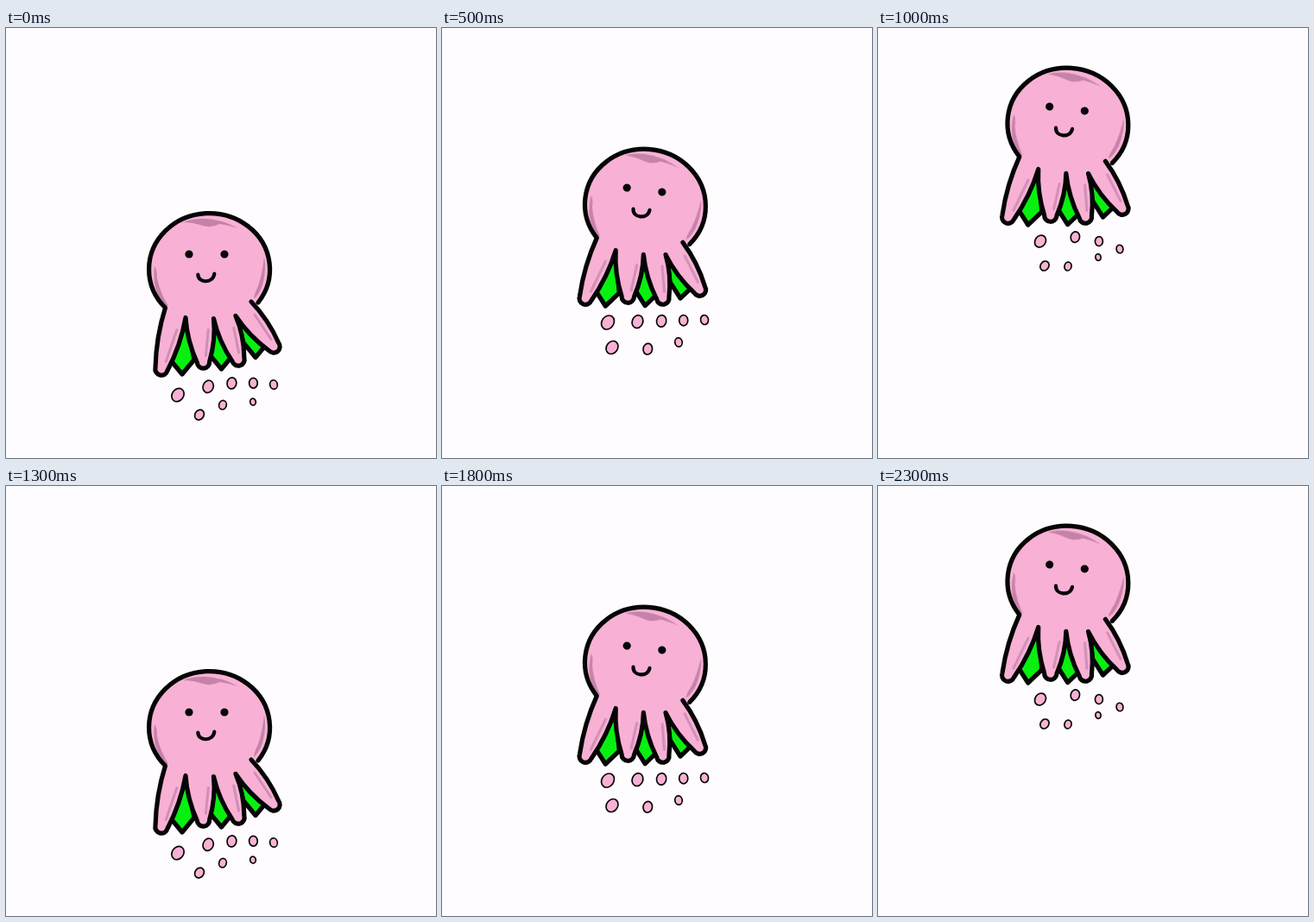
An HTML page for the animation above (2500 ms loop, 498 by 498 pixels).

```html
<!DOCTYPE html>
<html lang="en">
<head>
<meta charset="utf-8">
<title>Swimming octopus</title>
<style>
  html, body { margin: 0; width: 100%; height: 100%; overflow: hidden; background: #fefcff; }
  svg { display: block; width: 100vw; height: 100vh; }
</style>
</head>
<body>
<svg viewBox="0 0 498 498" fill="none" stroke="#050505" stroke-width="5.2" stroke-linecap="round" stroke-linejoin="round">
  <defs>
    <filter id="soft" x="-30%" y="-30%" width="160%" height="160%">
      <feGaussianBlur stdDeviation="0.7"/>
    </filter>
  </defs>
  <g id="octopus">
    <path id="gaps" fill="#08f010"/>
    <path id="body" fill="#f8b1d5" stroke="none"/>
    <g fill="#c583a9" stroke="none" filter="url(#soft)">
      <path d="M205 225Q235 214 269 232Q256 228 247 227Q238 232 228 229Q216 225 205 225Z"/>
      <path d="M172 276Q175 279 175 290Q178 305 188 322Q184 323 179 315Q169 298 172 276Z"/>
      <path d="M299 265Q302 280 297 298Q293 309 287 314Q287 309 292 299Q297 284 299 265Z"/>
    </g>
    <path id="streaks" stroke="#d08fb5" stroke-width="3" filter="url(#soft)"/>
    <path id="outline"/>
    <g fill="#050505" stroke="none">
      <circle cx="212" cy="262" r="4.6"/>
      <circle cx="253" cy="262" r="4.6"/>
    </g>
    <path d="M222.3 285.5C223 296 240 296 241.3 284.5" stroke-width="4.2"/>
  </g>
  <g id="bubbles" fill="#f8b1d5" stroke-width="1.7"></g>
</svg>
<script>
const $ = id => document.getElementById(id);
const mix = (a, b, u) => a + (b - a) * u;
const between = (p, q, u) => [mix(p[0], q[0], u), mix(p[1], q[1], u)];
const along = (p, n, k) => [p[0] + n[0] * k, p[1] + n[1] * k];

// Arms hang between neighbouring joints and end in a round tip.
const joints = [[184.5, 324], [208, 335.5], [240.5, 336.5], [266, 333.5], [284, 317]];
const tips = [[180, 395], [228.5, 387], [269, 384], [310, 369]];
const tipSize = 7.2, bulge = 5;

function arm(tip, i) {
  const a = joints[i], b = joints[i + 1], root = between(a, b, 0.5);
  const dx = tip[0] - root[0], dy = tip[1] - root[1], len = Math.hypot(dx, dy);
  const n = [dy / len, -dx / len];
  const left = along(tip, n, -tipSize), right = along(tip, n, tipSize);
  const bendL = along(between(a, left, 0.5), n, -bulge);
  const bendR = along(between(b, right, 0.5), n, bulge);
  const inner = u => along(between(b, right, u), n, -5);
  return {
    edge: `L${a}Q${bendL} ${left}A${tipSize} ${tipSize} 0 0 0 ${right}Q${bendR} ${b}`,
    streak: `M${inner(0.25)}L${inner(0.85)}`
  };
}

const arms = tips.map(arm);
const shape = 'M292 318A70 65 0 1 0 184.5 324' + arms.map(a => a.edge).join('');
$('body').setAttribute('d', shape);
$('outline').setAttribute('d', shape);
$('streaks').setAttribute('d', arms.map(a => a.streak).join(''));

// Green points seen between the arms.
const points = [[204, 401], [249.5, 395], [289, 381.5]];
$('gaps').setAttribute('d', points.map(([x, y], i) =>
  `M${joints[i + 1]}L${x - 14} ${y - 17}L${x} ${y}L${x + 14} ${y - 17}Z`).join(''));

// A row of bubbles that shrink from left to right.
function row(from, to, count, bow, pack, size) {
  return Array.from({ length: count }, (_, i) => {
    const u = (i / (count - 1)) ** pack;
    const [x, y] = between(from, to, u);
    const r = size * (1 - 0.35 * u);
    return `<ellipse rx="${r * 0.9}" ry="${r * 1.1}" transform="translate(${x} ${
      y + bow * Math.sin(Math.PI * u)}) rotate(${mix(35, -10, u)})"/>`;
  }).join('');
}

const low = { x: 232.5, y: 262, tilt: 0, bubbles:
  row([199, 425], [310, 413], 5, -7, 0.83, 7.4) + row([224, 448], [286, 433], 3, -5, 1.2, 5.6) };
const middle = { x: 234.5, y: 187.5, tilt: 7, bubbles:
  row([192, 341], [304, 338], 5, 0, 0.85, 7.7) + row([197, 370], [274, 364], 3, 5, 0.9, 7.2) };
const lean = { x: 188, y: 152, tilt: -14, bubbles:
  row([196, 312], [280, 276], 4, 2, 1.1, 7) + row([215, 325.5], [285, 306], 3, 6, 1, 6.6) };
const high = { x: 219, y: 93.5, tilt: 7, bubbles:
  row([188, 247], [280, 256], 4, -9, 0.75, 6.7) + row([193, 275.5], [255, 265.5], 3, 5, 1.2, 5.3) };
const lowLean = { x: lean.x + 8, y: lean.y + 83, tilt: lean.tilt,
  bubbles: `<g transform="translate(8 86)">${lean.bubbles}</g>` };

// Poses change hard, with alternating long and short holds.
const poses = [low, lowLean, middle, lean, high];
const long = 300, short = 200;
let shown;

function show(pose) {
  if (pose === shown) return;
  shown = pose;
  $('octopus').setAttribute('transform',
    `translate(${pose.x} ${pose.y}) rotate(${pose.tilt}) translate(-232.5 -262)`);
  $('bubbles').innerHTML = pose.bubbles;
}

function draw() {
  const pair = long + short, t = performance.now() % (pair * poses.length);
  const step = 2 * Math.floor(t / pair) + (t % pair >= long ? 1 : 0);
  show(poses[step % poses.length]);
  requestAnimationFrame(draw);
}
draw();
</script>
</body>
</html>
```
